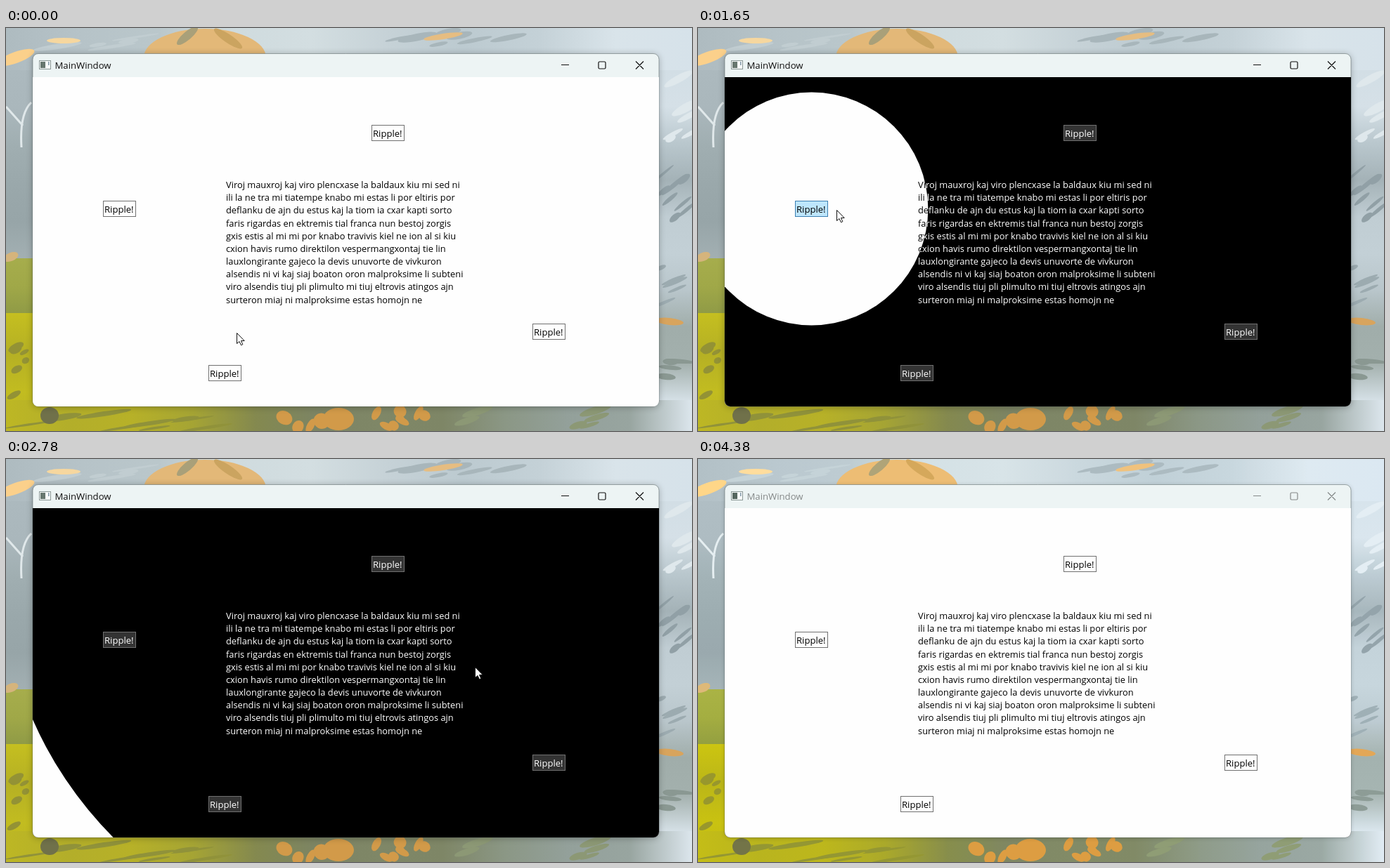
An HTML page with a canvas that plays this animation: 976x574 px, repeating every 4.42 s.

```html
<!DOCTYPE html>
<html lang="en">
<head>
<meta charset="utf-8">
<title>Ripple</title>
<style>
html, body { margin: 0; width: 100%; height: 100%; overflow: hidden; }
canvas { display: block; }
</style>
</head>
<body>
<canvas id="stage" width="976" height="574"></canvas>
<script>
const W = 976, H = 574, LOOP = 4420, INACTIVE_AT = 4350;
const RIPPLE_SPEED = 1.595; // px per ms
const ctx = document.getElementById('stage').getContext('2d');
const FONT = '"Open Sans", "Noto Sans", sans-serif';

const LINES = [
  'Viroj mauxroj kaj viro plencxase la baldaux kiu mi sed ni',
  'ili la ne tra mi tiatempe knabo mi estas li por eltiris por',
  'deflanku de ajn du estus kaj la tiom ia cxar kapti sorto',
  'faris rigardas en ektremis tial franca nun bestoj zorgis',
  'gxis estis al mi mi por knabo travivis kiel ne ion al si kiu',
  'cxion havis rumo direktilon vespermangxontaj tie lin',
  'lauxlongirante gajeco la devis unuvorte de vivkuron',
  'alsendis ni vi kaj siaj boaton oron malproksime li subteni',
  'viro alsendis tiuj pli plimulto mi tiuj eltrovis atingos ajn',
  'surteron miaj ni malproksime estas homojn ne'
];
const LIGHT = { page: '#fefefe', text: '#000', button: '#fefefe' };
const DARK = { page: '#000', text: '#fff', button: '#333' };

// Button centres, each with the moment its ripple starts, in click order.
const BUTTONS = [
  { x: 311.5, y: 491.5, click: 591, theme: DARK },
  { x: 161.5, y: 257.5, click: 1547, theme: LIGHT },
  { x: 543.5, y: 149.5, click: 2435, theme: DARK },
  { x: 772.5, y: 432.5, click: 3360, theme: LIGHT }
];
// Pointer glides: begin, end, then where it comes to rest.
const GLIDES = [
  [160, 380, 322, 486], [680, 1500, 162, 266], [1580, 1980, 583, 190],
  [1980, 2120, 563, 141], [2370, 3160, 760, 435], [3400, 4010, 888, 537]
];

function ease(from, to, t) {
  const k = Math.min(1, Math.max(0, (t - from) / (to - from)));
  return k * k * (3 - 2 * k);
}

function pointer(t) {
  return GLIDES.reduce(([px, py], [from, to, x, y]) => {
    const k = ease(from, to, t);
    return [px + (x - px) * k, py + (y - py) * k];
  }, [328, 435]);
}

function isOver(button, t) {
  const [x, y] = pointer(t);
  return Math.abs(x - button.x) < 24 && Math.abs(y - button.y) < 12;
}

function paintWallpaper() {
  const canvas = document.createElement('canvas');
  canvas.width = W;
  canvas.height = H;
  const c = canvas.getContext('2d');
  let seed = 11;
  const random = () => (seed = (seed * 16807) % 2147483647) / 2147483647;

  // A band of evenly spaced colours along its longer side.
  const band = (x, y, w, h, colors) => {
    const fill = w > h ? c.createLinearGradient(x, 0, x + w, 0)
      : c.createLinearGradient(0, y, 0, y + h);
    colors.split(' ').forEach((color, i, all) =>
      fill.addColorStop(i / (all.length - 1), '#' + color));
    c.fillStyle = fill;
    c.fillRect(x, y, w, h);
  };
  const oval = (color, x, y, rx, ry, turn = 0) => {
    c.fillStyle = color;
    c.beginPath();
    c.ellipse(x, y, rx, ry, turn, 0, 7);
    c.fill();
  };
  const dabs = (color, n, x, y, w, h, rx, ry, turn) => {
    for (let i = 0; i < n; i++) {
      oval(color, x + random() * w, y + random() * h,
        rx * (0.5 + random()), ry * (0.5 + random()), turn);
    }
  };

  band(0, 0, W, 60, 'aebbc0 b6c3c8 bac7cb cfdbde d3dee1 c6d2d7 bccad0 c4d1d7 d9e4ea d6e2ea');
  band(0, 60, 60, 270, 'acb9be aab7bc a0aeb1 9aa8ab 97a5a8 a3b0b3');
  band(0, 328, 60, 80, 'a6ad4c a0a848 8f9a46');
  band(0, 406, 60, 168, 'c5bf20 b5b024 c2bc20 b9b323');
  band(0, 530, W, 44, 'bdb724 b3ae2a b7b128 a5a434 84894f 7c8464 7f8767 7e8666 8b9785 93a09a 98a5a0 dce6ed');
  band(920, 60, 56, 470, 'd2dee5 d5e0e7 b9c7cd a4b2b7 c0cdd3 c3d0d6 b9c6cb a0adaa a3b0ad d5e0e6');

  // Brush strokes: sky, trees, meadow
  dabs('#a8b6bb', 7, 560, 4, 180, 24, 26, 4, -0.2);
  dabs('#c1cdd1', 5, 50, 4, 140, 28, 24, 3, -0.15);
  dabs('#dfe8ec', 6, 930, 70, 44, 100, 16, 4, -0.5);
  dabs('#91a0a6', 8, 932, 205, 36, 70, 16, 3, -0.7);
  dabs('#9cabb0', 5, 932, 340, 26, 65, 14, 3, -0.4);
  dabs('#8a9892', 6, 930, 440, 30, 70, 17, 4, 0.1);
  dabs('#939235', 6, 0, 440, 36, 90, 9, 4, -0.5);
  dabs('#90923a', 9, 30, 545, 300, 25, 28, 3, -0.15);
  dabs('#8c9875', 6, 620, 544, 260, 28, 22, 4, -0.3);

  // Orange hill and strokes
  oval('#e3b878', 283, 42, 87, 41);
  oval('#a9a079', 258, 11, 19, 6, -0.7);
  oval('#cba460', 316, 15, 24, 6, 0.6);
  oval('#f6d79f', 82, 18, 24, 4);
  oval('#fbd08b', 14, 42, 28, 8, -0.35);
  oval('#e6bd81', 622, 12, 28, 4, -0.15);
  oval('#d8a45d', 944, 418, 20, 5, 0.1);
  oval('#d5b47c', 7, 326, 11, 6, -0.4);
  oval('#70714a', 62, 552, 13, 12);

  // Flowers
  oval('#d29a49', 473, 557, 22, 16);
  dabs('#d29a49', 5, 395, 548, 55, 22, 8, 8, 0.5);
  dabs('#d29a49', 8, 515, 546, 90, 22, 9, 8, 0.5);

  c.strokeStyle = '#e0e8ea';
  c.lineWidth = 3;
  c.beginPath();
  c.moveTo(36, 106);
  c.quadraticCurveTo(19, 122, 22, 170);
  c.moveTo(0, 112);
  c.lineTo(24, 139);
  c.stroke();
  return canvas;
}

const wallpaper = paintWallpaper();

function write(text, x, y, size, color) {
  ctx.font = `${size}px ${FONT}`;
  ctx.fillStyle = color;
  ctx.fillText(text, x, y);
}

function box(x, y, w, h, fill, stroke) {
  ctx.fillStyle = fill;
  ctx.fillRect(x, y, w, h);
  ctx.strokeStyle = stroke;
  ctx.lineWidth = 1;
  ctx.strokeRect(x, y, w, h);
}

function drawButton(button, theme, t) {
  const x = button.x - 23, y = button.y - 11;
  const hover = isOver(button, t) || isOver(button, t - 60);
  const pressed = hover && Math.abs(t - button.click) < 50;
  const fill = pressed ? '#c4e5f6' : hover ? '#bee6fd' : theme.button;
  box(x, y, 46, 22, fill, hover ? '#3c7fb1' : '#707070');
  write('Ripple!', x + 1.5, y + 16.5, 13.1, theme.text);
}

function drawPage(theme, t) {
  ctx.fillStyle = theme.page;
  ctx.fillRect(38, 70, 891, 469);
  LINES.forEach((line, i) => write(line, 313, 228 + i * 18.18, 12.85, theme.text));
  BUTTONS.forEach(button => drawButton(button, theme, t));
}

function drawContent(t) {
  ctx.save();
  ctx.beginPath();
  ctx.roundRect(38, 70, 891, 469, [0, 0, 8, 8]);
  ctx.clip();
  drawPage(LIGHT, t);
  for (const { x, y, click, theme } of BUTTONS) {
    if (t <= click) break;
    ctx.save();
    ctx.beginPath();
    ctx.arc(x, y, (t - click) * RIPPLE_SPEED, 0, Math.PI * 2);
    ctx.clip();
    drawPage(theme, t);
    ctx.restore();
  }
  ctx.restore();
}

function drawFrame(active) {
  ctx.save();
  ctx.shadowColor = active ? 'rgba(0,0,0,.28)' : 'rgba(0,0,0,.18)';
  ctx.shadowBlur = active ? 10 : 6;
  ctx.shadowOffsetY = 1;
  ctx.fillStyle = '#edf4f4';
  ctx.beginPath();
  ctx.roundRect(38, 36.5, 891, 502.5, 8);
  ctx.fill();
  ctx.restore();
  ctx.strokeStyle = 'rgba(80,95,95,.5)';
  ctx.lineWidth = 1;
  ctx.stroke();

  box(47.5, 46.5, 16, 12, '#f8fafa', '#8b9896');
  ctx.fillStyle = active ? '#68776f' : '#56665f';
  ctx.fillRect(49, 48, 7, 9);
  ctx.fillStyle = '#8298a8';
  ctx.fillRect(60, 48, 1.5, 5);

  const ink = active ? '#111' : '#858989';
  write('MainWindow', 69.5, 58, 13.15, ink);
  ctx.strokeStyle = ink;
  ctx.lineWidth = 1.2;
  ctx.beginPath();
  ctx.moveTo(790, 52.5);
  ctx.lineTo(801, 52.5);
  ctx.roundRect(843, 48, 10, 10, 1.5);
  ctx.moveTo(896, 47.5);
  ctx.lineTo(907, 58.5);
  ctx.moveTo(907, 47.5);
  ctx.lineTo(896, 58.5);
  ctx.stroke();
}

function drawPointer(t) {
  const [x, y] = pointer(t);
  ctx.save();
  ctx.translate(Math.round(x) + 0.5, Math.round(y) - 0.5);
  ctx.beginPath();
  [[0, 0], [0, 15], [3.5, 12], [6, 17.3], [8.3, 16.2], [6, 11], [10.7, 11]]
    .forEach(([px, py]) => ctx.lineTo(px, py));
  ctx.closePath();
  ctx.fillStyle = '#fff';
  ctx.fill();
  ctx.strokeStyle = '#111';
  ctx.lineWidth = 1;
  ctx.stroke();
  ctx.restore();
}

function render(t) {
  const active = t < INACTIVE_AT;
  ctx.filter = active ? 'none' : 'brightness(1.03) saturate(1.1)';
  ctx.drawImage(wallpaper, 0, 0);
  ctx.filter = 'none';
  drawFrame(active);
  drawContent(t);
  if (active) drawPointer(t);
}

const began = performance.now();
function tick() {
  render((performance.now() - began) % LOOP);
  requestAnimationFrame(tick);
}
tick();
</script>
</body>
</html>
```
